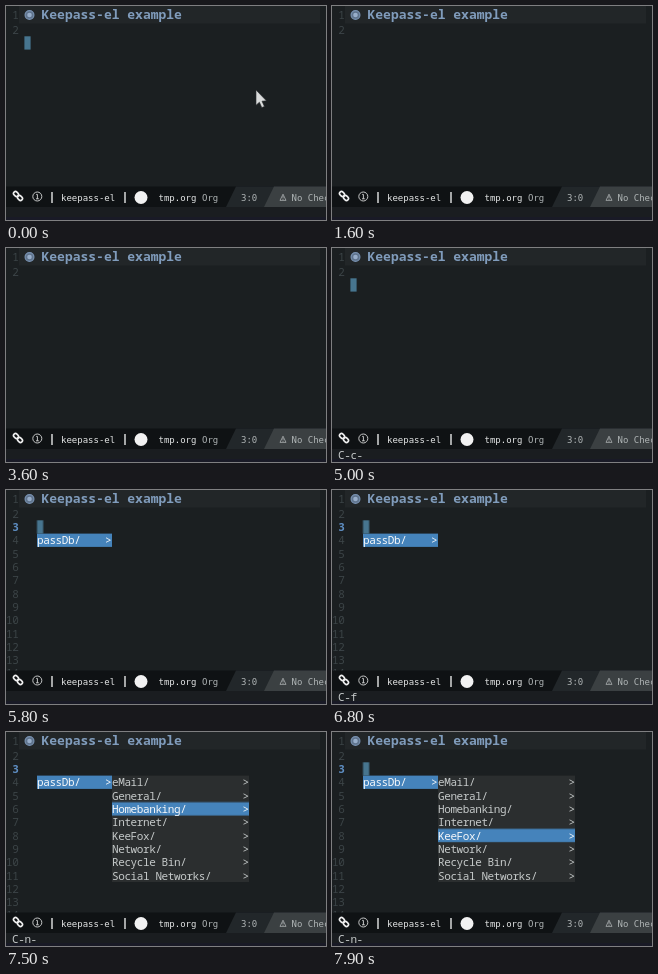
An HTML page for the animation above (8 s loop, 320 by 214 pixels).

```html
<!DOCTYPE html>
<html lang="en">
<head>
<meta charset="utf-8">
<title>Editor menu</title>
<style>
html, body { margin: 0; width: 100%; height: 100%; overflow: hidden; background: #1b1f21; }
svg { display: block; width: 320px; height: 214px; fill: #c6caca; }
text { white-space: pre; }
.code { font: 11px "Noto Sans Mono", monospace; letter-spacing: -.4px; }
.title { font: 600 13px "Noto Sans Mono", monospace; fill: #809cbc; }
.bar { font: 9px "DejaVu Sans Mono", monospace; }
.bar text { fill: #e4e6e6; }
.bar .dim { fill: #b0b5b6; }
.num { fill: #3c4447; text-anchor: end; }
.now { fill: #5f8fc4; font-weight: 700; }
.lit { fill: #f6f8fa; }

/* 1% = 80 ms */
.pointer, .cursor, .menu, .sub, .pick, .swap, .k1, .k2, .k3, .k4 {
  animation: 8s step-end infinite;
}
.pointer { animation-name: pointer; }
.cursor { animation-name: blink; }
.swap { animation-name: shift; }
.menu { animation-name: menu; }
.sub { animation-name: sub; }
.pick { animation-name: pick; }
.k1 { animation-name: k1; }
.k2 { animation-name: k2; }
.k3 { animation-name: k3; }
.k4 { animation-name: k4; }
@keyframes pointer { 0% { opacity: 1 } 1.25%, 100% { opacity: 0 } }
@keyframes blink {
  0%, 12.5%, 25%, 37.5%, 50%, 62.5%, 83.75%, 97.5% { opacity: 1 }
  6.25%, 20%, 32.5%, 45%, 56.25%, 77.5%, 91.25% { opacity: 0 }
  100% { opacity: 1 }
}
@keyframes shift { 0% { transform: none } 71.25%, 100% { transform: translateX(12.6px) } }
@keyframes menu { 0% { opacity: 0 } 71.25%, 100% { opacity: 1 } }
@keyframes sub { 0% { opacity: 0 } 86.25%, 100% { opacity: 1 } }
@keyframes pick {
  0% { transform: none }
  90% { transform: translateY(13.3px) }
  92.5% { transform: translateY(26.6px) }
  95% { transform: translateY(39.9px) }
  97.5%, 100% { transform: translateY(53.2px) }
}
@keyframes k1 { 0%, 70%, 100% { opacity: 0 } 60% { opacity: 1 } }
@keyframes k2 { 0%, 90%, 100% { opacity: 0 } 82.5% { opacity: 1 } }
@keyframes k3 { 0% { opacity: 0 } 90%, 100% { opacity: 1 } }
@keyframes k4 { 0% { opacity: 0 } 91.25%, 100% { opacity: 1 } }
</style>
</head>
<body>
<svg viewBox="0 0 320 214">
  <clipPath id="picked"><rect class="pick" x="106" y="43.6" width="137" height="13.3"/></clipPath>

  <rect width="320" height="214" fill="#1b1f21"/>
  <rect x="13" width="301" height="17.5" fill="#222628"/>
  <circle cx="23.5" cy="9" r="4.4" fill="#5f738c" stroke="#7891b0" stroke-width="1.2"/>
  <circle cx="23.5" cy="9" r="2.3" fill="#98aeca"/>
  <text class="title" x="35.5" y="13.3">Keepass-el example</text>

  <g class="code">
    <text class="num" x="12.4" y="13">1</text>
    <text class="num" x="12.4" y="28">2</text>
    <g class="menu">
      <g id="nums"></g>
      <rect x="31" y="43.6" width="75" height="13.3" fill="#4583bb"/>
      <text class="lit" x="31" y="54.4">passDb/</text>
      <text class="lit" x="99" y="54.4">&gt;</text>
    </g>
    <g class="sub">
      <rect x="106" y="43.6" width="137" height="106.4" fill="#2b2e2f"/>
      <g id="items"></g>
      <rect class="pick" x="106" y="43.6" width="137" height="13.3" fill="#4583bb"/>
      <g clip-path="url(#picked)"><use class="lit" href="#items"/></g>
    </g>
  </g>
  <g class="swap"><rect class="cursor" x="18.4" y="30.3" width="6.2" height="13.3" fill="#47758f"/></g>

  <g class="bar">
    <rect y="180.5" width="320" height="20.5" fill="#0f1214"/>
    <path d="M220 201l10-20.5h90v20.5z" fill="#22272a"/>
    <path d="M258 201l10-20.5h52v20.5z" fill="#3b4042"/>
    <g fill="none" stroke="#f0f0f0" stroke-width="1.6">
      <rect x="-2.7" y="-2" width="5.4" height="4" rx="2" transform="translate(10 188)rotate(45)"/>
      <rect x="-2.7" y="-2" width="5.4" height="4" rx="2" transform="translate(14 192)rotate(45)"/>
    </g>
    <circle cx="31.3" cy="190.5" r="4.5" fill="none" stroke="#d8dada" stroke-width=".9"/>
    <path d="M30.2 188.4h1.2v4.4M30 192.8h2.8" fill="none" stroke="#d8dada" stroke-width=".9"/>
    <path d="M46 186v11M119 186v11" stroke="#e4e6e6" stroke-width="1.4"/>
    <text x="55" y="195">keepass-el</text>
    <circle cx="135" cy="191.5" r="6.5" fill="#f2f2f2"/>
    <text x="152.5" y="195">tmp.org</text>
    <text class="dim" x="196" y="195">Org</text>
    <text class="dim" x="235" y="195">3:0</text>
    <path d="M277 188.2l3 6.2h-6zM277 190v2.4M277 193.1v.8" fill="none" stroke="#b9bebf" stroke-width=".7"/>
    <text class="dim" x="285.5" y="195">No Check</text>
  </g>

  <rect y="201" width="320" height="13" fill="#1a1d20"/>
  <rect y="211" width="320" height="3" fill="#191a26"/>
  <g class="code">
    <text class="k1" x="6" y="211">C-c-</text>
    <text class="k2" x="6" y="211">C-f</text>
    <text class="k3" x="6" y="211">C-n</text>
    <text class="k4" x="24.6" y="211">-</text>
  </g>

  <path class="pointer" d="M250 84v15.2l3.4-3 2.4 5.4 2.6-1.2-2.4-5.2 4.4-.4z" fill="#d9dbdb" stroke="#2a2d2f" stroke-width=".6"/>
</svg>
<script>
const ROW = 13.3;

function addText(id, x, y, label, cls = "") {
  const t = document.createElementNS("http://www.w3.org/2000/svg", "text");
  t.setAttribute("x", x);
  t.setAttribute("y", y);
  t.setAttribute("class", cls);
  t.textContent = label;
  document.getElementById(id).append(t);
}

for (let n = 3; n <= 14; n++) {
  addText("nums", 12.4, 41.1 + (n - 3) * ROW, n, n === 3 ? "num now" : "num");
}

["eMail", "General", "Homebanking", "Internet", "KeeFox", "Network", "Recycle Bin", "Social Networks"]
  .forEach((name, i) => {
    const y = 54.4 + i * ROW;
    addText("items", 106, y, name + "/");
    addText("items", 236.5, y, ">");
  });
</script>
</body>
</html>
```
